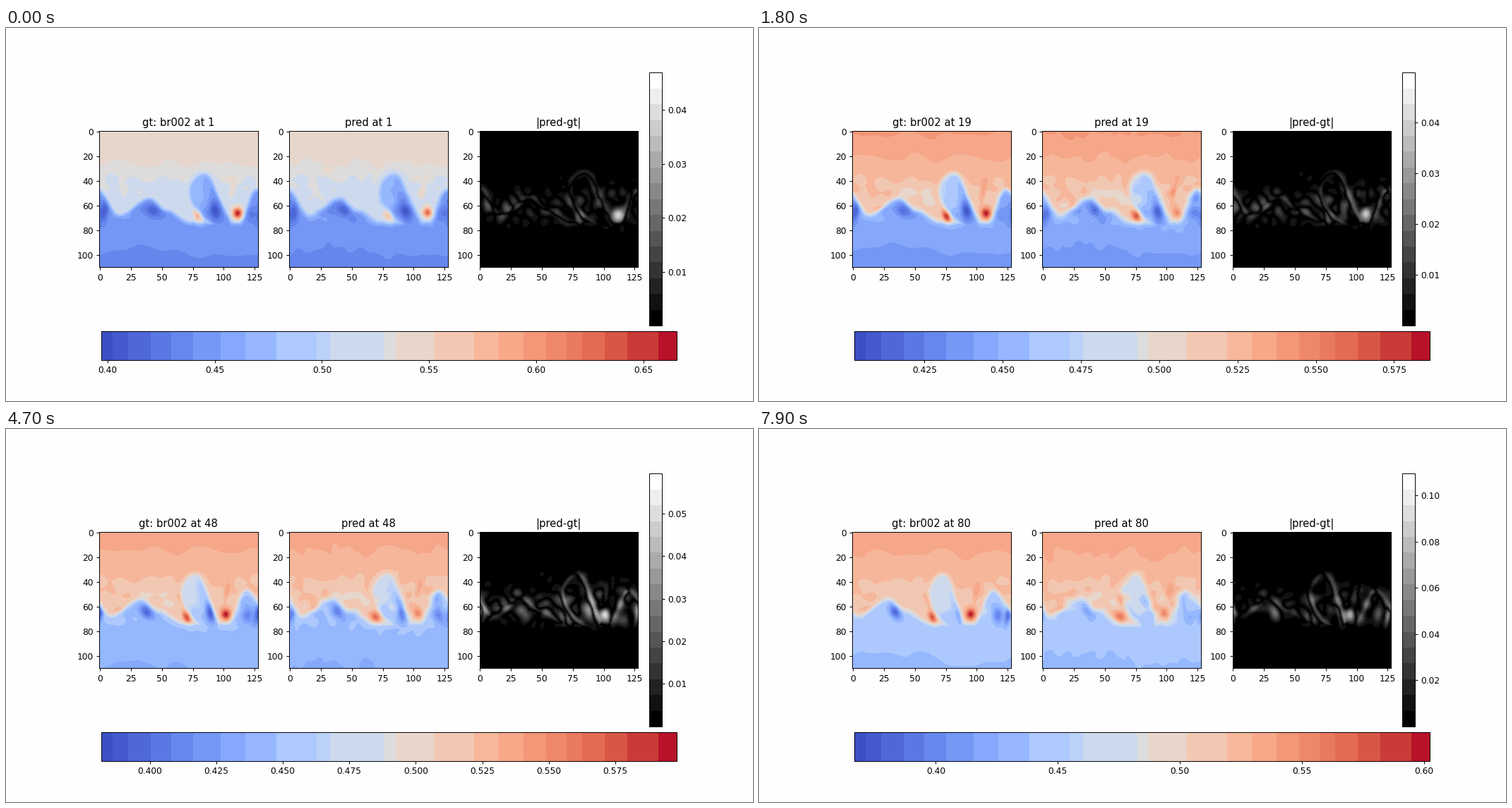
These frames come from a looping animation (1058 by 529 pixels, 8 s). A matplotlib script:

```python
import numpy as np
import matplotlib.pyplot as plt
from matplotlib.animation import FuncAnimation
from matplotlib.colors import ListedColormap

W, H, STEPS = 1058, 529, 80
NX, NY = 128, 110
x = np.arange(NX)
X, Y = np.meshgrid(x, np.arange(NY))

# Colour limits at a few steps
KEYS = [1, 11, 27, 39, 48, 60, 80]
LOW = [.397, .4052, .39999, .3891, .3818, .3762, .3666]
HIGH = [.6655, .5822, .5904, .5951, .5979, .6003, .6023]
ERROR = [.0469, .0451, .0545, .0636, .0593, .0784, .1093]

# Crests and troughs of the interface: x at first and last step, depth
CRESTS = np.array([(-2, -15, 46.5), (15.5, 4, 67.5), (40, 29, 54),
                   (54, 44, 64), (73, 62, 73.5), (112, 97, 73.5)])

# Spots: x at first and last step, y, sx, sy, tilt, offset or value
COLD = [(43, 34, 64, 4, 4.5, .3, .015), (93, 87, 64, 2.8, 6, .1, .004),
        (131, 125.5, 65, 2.4, 6.5, -.2, .006), (122, 117, 67, 4, 5, 0, .03)]
WARM = [(107, 99.5, 47, 2, 6, -.2, .537), (74, 61, 56, 2, 6, .4, .534),
        (24, 10, 61.5, 3.2, 1.8, -1.4, .532)]


def waves(seed, count, short, long):
    """Random plane waves, periodic in x."""
    rng = np.random.default_rng(seed)
    freq = 2 * np.pi / rng.uniform(short, long, count)
    turn, phase = rng.uniform(0, 2 * np.pi, (2, count))
    unit = 2 * np.pi / NX
    kx = np.round(freq * np.cos(turn) / unit) * unit
    return list(zip(kx, freq * np.sin(turn), phase,
                    rng.uniform(-.03, .03, count)))


WISPS = waves(3, 14, 11, 26)
RIPPLES = waves(8, 24, 9, 20)
BROAD = waves(5, 8, 22, 45)


def noise(parts, s):
    total = sum(np.sin(kx * (X + .19 * s) + ky * Y + p + w * s)
                for kx, ky, p, w in parts)
    return total * np.sqrt(2 / len(parts))


def lerp(a, b, t):
    return a + (b - a) * t


def sig(v):
    return 1 / (1 + np.exp(-np.clip(v, -40, 40)))


def band(center, width):
    return np.exp(-((Y - center) / width) ** 2)


def pull(v, cx, cy, sx, sy, tilt, value):
    """Draw the field towards a value around a tilted spot."""
    dy = Y - cy
    dx = (X - cx + NX / 2) % NX - NX / 2 - tilt * dy
    return v + (value - v) * np.exp(-((dx / sx) ** 2 + (dy / sy) ** 2) / 2)


def limit(values, s):
    return np.interp(s, KEYS, values)


def high(s):
    if s > 11:
        return limit(HIGH, s)
    return lerp(HIGH[1], HIGH[0], np.exp(-(s - 1) / 4) * (11 - s) / 10)


def interface(t, lag):
    """Depth of the wavy line: cosine easing between its extremes."""
    px = lerp(CRESTS[:, 0], CRESTS[:, 1], t) + lag
    px = np.append(px, px[0] + NX)
    py = np.append(CRESTS[:, 2], CRESTS[0, 2])
    at = (x - px[0]) % NX + px[0]
    i = np.searchsorted(px, at, "right") - 1
    u = (at - px[i]) / (px[i + 1] - px[i])
    return lerp(py[i], py[i + 1], (1 - np.cos(np.pi * u)) / 2)


def field(s, pred=False):
    t = (s - 1) / (STEPS - 1)
    lag = 2.5 * t if pred else 0
    width = 1.25 if pred else .9

    # Blue side: below the interface, or inside a leaning elliptic plume
    depth = interface(t, lag)
    below = sig((Y - depth) / np.hypot(1, np.gradient(depth)) / width)
    radius = lerp(12, 10.2, t)
    mid = lerp(82.5, 71.2, t) + lag + lerp(.016, .0105, t) * (Y - 43) ** 2
    across = (X - mid) / radius
    ring = 1 - np.hypot(across, (Y - 58) / 24)
    slope = np.maximum(np.hypot(*np.gradient(ring)), .03)
    plume = sig(ring / slope / width)
    blue = np.maximum(below, plume)

    broad, wisps = noise(BROAD, s), noise(WISPS, s)
    upper = .5385 - .0025 * t + .006 * np.exp(-(s - 1) / 4)
    upper = upper - .00038 * Y + .0007 * broad
    upper += .0038 * wisps * band(50, 13)
    upper -= .012 * band(53, 10) * np.exp(-((X - lerp(56, 45, t)) / 17) ** 2)

    bend = 4.5 * np.cos((X - 33) * 2 * np.pi / NX)
    lower = .4475 - .00035 * np.clip(Y + bend - 76, -3, 40)
    lower += .0007 * broad + .004 * wisps * band(64, 8)
    q = np.clip((across + 1) / 2, 0, 1)
    pale = lerp(.470, .480, t) - .04 * q ** 3
    lower += (pale - lower) * plume * sig((62 - Y) / 3)

    for x0, x1, *shape, value in WARM:
        upper = pull(upper, lerp(x0, x1, t) + lag, *shape, value)
    for x0, x1, cy, sx, sy, tilt, rise in COLD:
        value = limit(LOW, s) + rise
        if pred:
            value = lerp(value, .436, .6 * t)
        lower = pull(lower, lerp(x0, x1, t) + lag, cy, sx * (1.3 - .5 * t),
                     sy, tilt, value)
    v = lerp(upper, lower, blue)

    if pred:
        v = pull(v, lerp(79, 62, t), 68, lerp(2.6, 3.6, t), 3.4, .3, .565)
        v = pull(v, lerp(111, 97.8, t), 65.5, 2.6, 3, 0,
                 high(s) - lerp(.04, .05, t))
        v += lerp(.0035, .0065, t) * noise(RIPPLES, s) * (band(58, 15) + .12)
    else:
        v = pull(v, lerp(78.8, 64, t), 68.5, 2.2, 3.4, .3, .58)
        v = pull(v, lerp(111, 95, t), 66, 2.8, 3.2, 0, high(s))
    return np.clip(v, limit(LOW, s), high(s))


# Uneven colour bands, as seen along the 815 px wide bar
EDGES = np.array([0, 16, 38, 69, 99, 130, 168, 203, 249, 306, 324, 400, 416,
                  471, 528, 563, 599, 630, 658, 682, 712, 744, 790, 815]) / 815
mids = (EDGES[:-1] + EDGES[1:]) / 2
slots = np.searchsorted(EDGES, (np.arange(256) + .5) / 256, "right") - 1
warm_cool = ListedColormap(plt.get_cmap("coolwarm")(mids[slots]))
greys = plt.get_cmap("gray", 16)

fig, axes = plt.subplots(1, 3, figsize=(12, 6), dpi=W / 12,
                         facecolor="#fefefe")
images = [ax.imshow(np.zeros((NY, NX)), cmap=cmap, vmin=0, vmax=1)
          for ax, cmap in zip(axes, (warm_cool, warm_cool, greys))]
axes[2].set_title("|pred-gt|")
fig.colorbar(images[0], ax=axes, orientation="horizontal",
             fraction=.1, pad=.02)
fig.colorbar(images[2], ax=axes, fraction=.05, pad=.02)


def draw(i):
    s = i + 1
    gt, pred = field(s), field(s, True)
    top = limit(ERROR, s)
    err = top * np.tanh(1.2 * np.abs(pred - gt) / top)
    for im, data in zip(images, (gt, pred, err)):
        im.set_data(data)
    for im in images[:2]:
        im.set_clim(limit(LOW, s), high(s))
    images[2].set_clim(max(err.min(), 1e-6), top)
    axes[0].set_title(f"gt: br002 at {s}")
    axes[1].set_title(f"pred at {s}")
    return images


anim = FuncAnimation(fig, draw, frames=STEPS, interval=100, repeat=True,
                     repeat_delay=0, blit=False)
plt.show()
```
